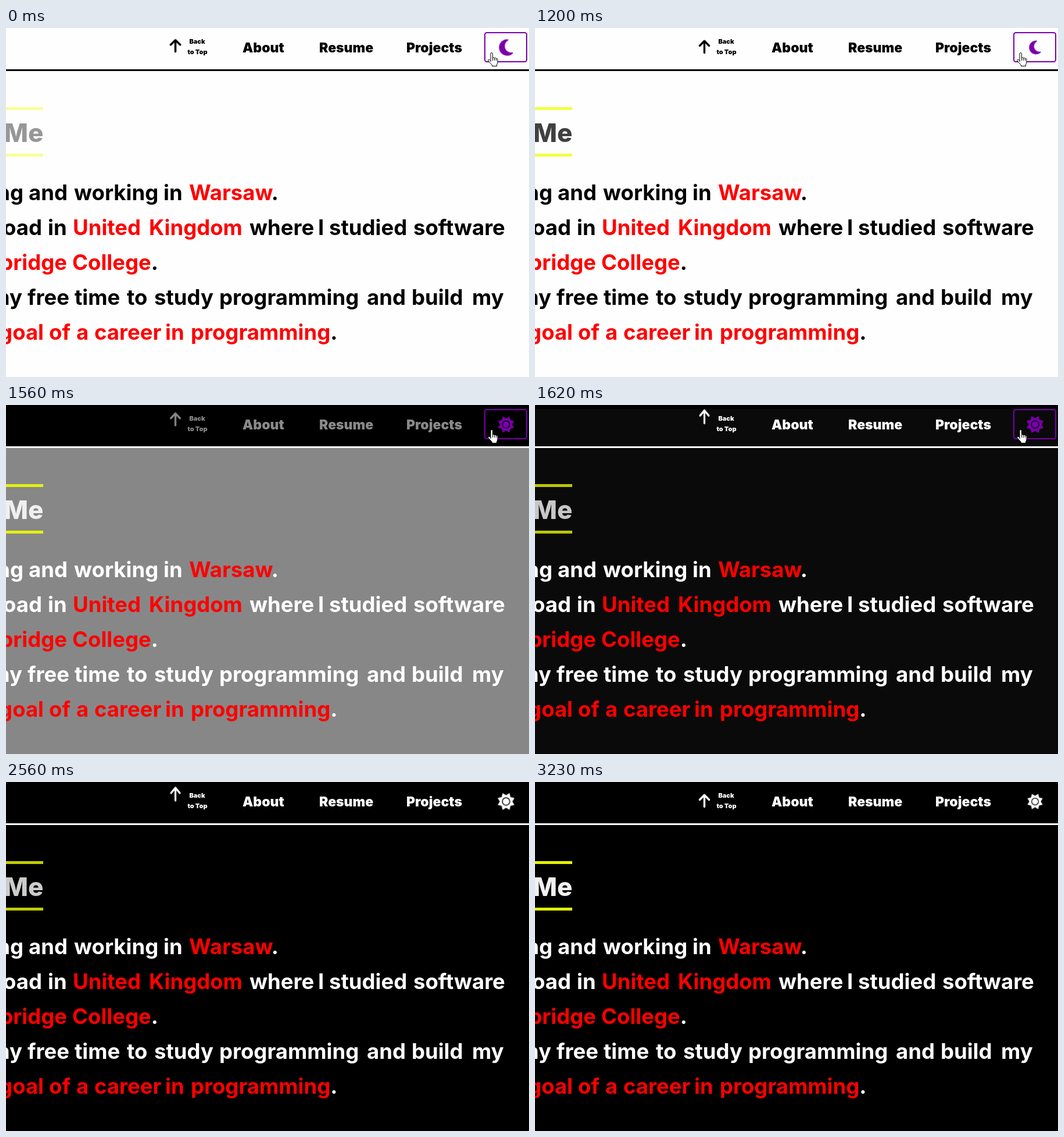
Write an HTML page that moves like this. It is 900 by 600 pixels and loops after 3.29 s.

```html
<!DOCTYPE html>
<html lang="en">
<head>
<meta charset="utf-8">
<title>Theme toggle</title>
<style>
html, body { margin: 0; width: 100%; height: 100%; overflow: hidden; background: #fefefe; }
svg { display: block; width: 900px; height: 600px; }
text { font-family: Inter, "Noto Sans", sans-serif; fill: currentColor; }

.copy { font-size: 36.5px; font-weight: 700; }
.copy .hot { fill: #f00; }
.nav { font-size: 23px; font-weight: 900; }
.nav .small { font-size: 11px; font-weight: 900; text-anchor: middle; }
.title { font-size: 44px; font-weight: 800; text-anchor: end; }

/* one pass of the whole loop */
.page, .bar, .ink, .nav, .hover, .frame, .moon, .sun, .hand, .pointer {
  animation: 3290ms linear infinite;
}
.page { animation-name: page; }
.bar { animation-name: bar; animation-timing-function: step-end; }
.ink { animation-name: ink; animation-timing-function: step-end; }
.nav { animation-name: nav; }
.hover { animation-name: hover; animation-timing-function: step-end; }
.frame, .hand { animation-name: leave; animation-timing-function: step-end; }
.moon { animation-name: moon; animation-timing-function: step-end; }
.sun { animation-name: sun; animation-timing-function: step-end; }
.pointer { animation-name: pointer; }

/* short repeating effects */
.bounce, .beat, .fade { animation: 955ms -492ms infinite; }
.bounce, .beat { transform-box: fill-box; transform-origin: center; }
.bounce { animation-name: bounce; animation-timing-function: cubic-bezier(.28, .84, .42, 1); }
.beat { animation-name: beat; animation-timing-function: ease-in-out; }
.fade { animation-name: fade; animation-timing-function: cubic-bezier(.4, 0, .6, 1); }

@keyframes page {
  0%, 45.75% { fill: #fefefe; }
  49.24% { fill: #0a0a0a; }
  51.4%, 100% { fill: #000; }
}
@keyframes bar {
  0% { height: 0; }
  45.29% { height: 71px; }
  48.33%, 100% { height: 7px; }
}
@keyframes ink {
  0% { color: #000; }
  45.29%, 100% { color: #fff; }
}
@keyframes nav {
  0%, 45.75% { color: #000; }
  48.9%, 100% { color: #fff; }
}
@keyframes hover {
  0% { color: #7a00ab; }
  52.9%, 100% { color: #fff; }
}
@keyframes leave {
  0% { opacity: 1; }
  52.9%, 100% { opacity: 0; }
}
@keyframes moon {
  0% { opacity: 1; }
  45.29%, 100% { opacity: 0; }
}
@keyframes sun {
  0% { opacity: 0; }
  45.29%, 100% { opacity: 1; }
}
@keyframes pointer {
  0%, 52.89% { opacity: 0; transform: translate(838px, 60px); }
  52.9% { opacity: 1; transform: translate(838px, 60px); }
  66.2% { opacity: 1; transform: translate(870px, 522px); }
  71.4%, 75.99% { opacity: 1; transform: translate(876px, 565px); }
  76%, 100% { opacity: 0; transform: translate(876px, 565px); }
}
@keyframes bounce {
  0% { transform: scale(1, 1) translateY(0); }
  10% { transform: scale(1.1, .9) translateY(0); }
  30% { transform: scale(.9, 1.1) translateY(-12px); }
  50% { transform: scale(1.05, .95) translateY(0); }
  57% { transform: scale(1, 1) translateY(-3px); }
  64%, 100% { transform: scale(1, 1) translateY(0); }
}
@keyframes beat {
  0%, 90%, 100% { transform: scale(1); }
  45% { transform: scale(1.25); }
}
@keyframes fade {
  0%, 100% { opacity: 1; }
  50% { opacity: .4; }
}
</style>
</head>
<body>
<svg viewBox="0 0 900 600">
  <rect class="page" width="900" height="600"/>
  <rect class="bar" width="900" height="0"/>

  <g class="ink">
    <rect y="71" width="900" height="3" fill="currentColor"/>
    <g class="fade">
      <path d="M0 138.5H64M0 218.5H64" stroke="#f0ff00" stroke-width="5"/>
      <text class="title" x="64.5" y="196">Me</text>
    </g>
    <g class="copy" id="copy"></g>
  </g>

  <g class="nav">
    <path class="bounce" d="M291.5 42.5V22.5M283.5 30.5L291.5 22.3L299.5 30.5" fill="none" stroke="currentColor"
      stroke-width="3.4" stroke-linecap="round" stroke-linejoin="round"/>
    <text class="small" x="329" y="27">Back</text>
    <text class="small" x="329.5" y="45">to Top</text>
    <text x="407" y="42">About</text>
    <text x="539" y="42">Resume</text>
    <text x="689" y="42">Projects</text>
  </g>

  <g class="hover">
    <rect class="frame" x="824" y="8" width="72" height="50" rx="3.5" fill="none" stroke="currentColor" stroke-width="2"/>
    <g class="moon">
      <g class="beat">
        <path transform="translate(850.7 20.5) scale(.0508)" fill="currentColor"
          d="M223 32C100 32 0 132 0 256S100 480 223 480c61 0 116-24 156-63c14-14 3-30-14-27c-118 16-205-72-205-173c0-66 36-123 89-153c14-9 9-28-7-30z"/>
      </g>
    </g>
    <g class="sun">
      <g class="beat">
        <g transform="translate(860.5 33.5) scale(.0508)">
          <polygon id="star" fill="currentColor" stroke="currentColor" stroke-width="22" stroke-linejoin="round"/>
          <circle r="115" fill="none" stroke="#000" stroke-width="27"/>
        </g>
      </g>
    </g>
  </g>

  <g fill="#fff" stroke="#000" stroke-linejoin="round">
    <g class="hand">
      <path transform="translate(829 42)"
        d="M5 16V2.2a1.7 1.7 0 0 1 3.4 0V9.5a1.6 1.6 0 0 1 3 .6a1.6 1.6 0 0 1 3 .7a1.5 1.5 0 0 1 2.6 1.2V17q0 2-1.5 4v2.5H7.5V22Q4 18 1 14.5q-1-1.6.5-2.3t3.5 2.3M8.4 9.5V14M11.4 10.2V14M14.4 11V14"/>
    </g>
    <path class="pointer" d="M0 0V16l3.7-3.6 2.6 6 2.4-1-2.6-5.9H11z"/>
  </g>
</svg>
<script>
const LOOP = 3290;
const NS = 'http://www.w3.org/2000/svg';

// word@x; a minus sign means x is the right edge, a star means red
const rows = [
  'ng@-30 and@39 working@117 in@271 *Warsaw@315 .',
  'oad@-62 in@72 *United@115 *Kingdom@246 where@419 I@537 studied@556 software@701',
  '*bridge@-105 *College@114 .',
  'my@-28 free@37 time@118 to@208 study@255 programming@367 and@621 build@698 my@802',
  '*goal@-65 *of@74 *a@121 *career@152 *in@274 *programming@318 .'
];

function add(parent, name, attrs) {
  const el = document.createElementNS(NS, name);
  for (const key in attrs) el.setAttribute(key, attrs[key]);
  return parent.appendChild(el);
}

rows.forEach((row, i) => {
  const line = add(document.getElementById('copy'), 'text', { y: 296 + 60 * i });
  for (const token of row.split(' ')) {
    const [word, x] = token.split('@');
    const attrs = {};
    if (x) {
      attrs.x = Math.abs(x);
      attrs['text-anchor'] = x < 0 ? 'end' : 'start';
    }
    if (word[0] === '*') attrs.class = 'hot';
    add(line, 'tspan', attrs).textContent = word.replace('*', '');
  }
});

const points = Array.from({ length: 16 }, (_, i) => {
  const r = i % 2 ? 262 : 180;
  const a = i * Math.PI / 8;
  return (r * Math.cos(a)).toFixed(1) + ',' + (r * Math.sin(a)).toFixed(1);
});
document.getElementById('star').setAttribute('points', points.join(' '));

// every effect restarts together when the loop wraps
const effects = document.getAnimations();
effects.forEach(e => e.pause());
const start = performance.now();
function tick() {
  const t = (performance.now() - start) % LOOP;
  effects.forEach(e => { e.currentTime = t; });
  requestAnimationFrame(tick);
}
tick();
</script>
</body>
</html>
```
